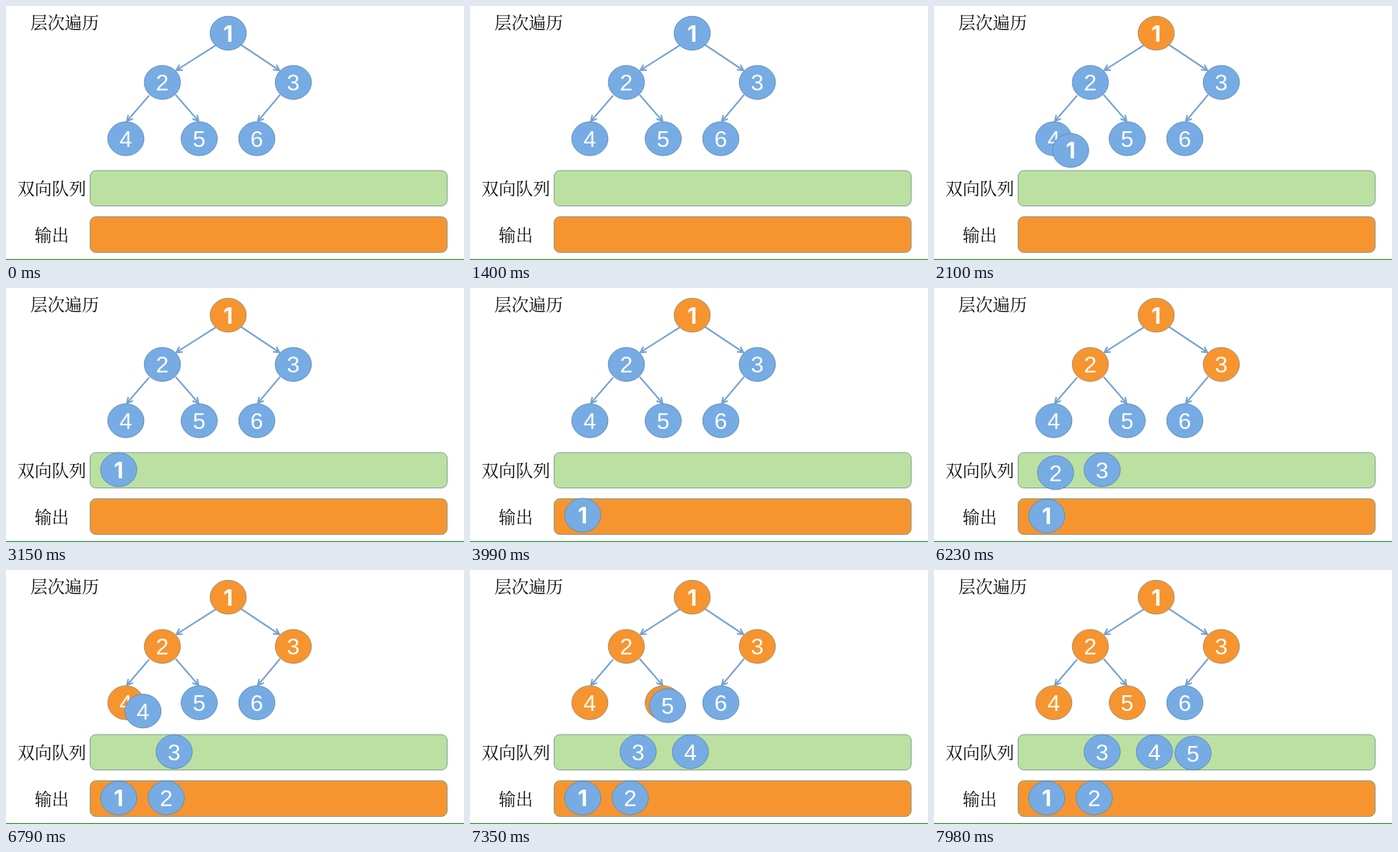
Recreate the animation shown at these times as an HTML page. Size 640 by 355 pixels, loop 8 s.

```html
<!DOCTYPE html>
<html lang="zh">
<head>
<meta charset="utf-8">
<style>
  html, body { margin: 0; width: 100%; height: 100%; overflow: hidden; background: #fff; }
  svg { display: block; width: 640px; height: 355px; }
  .label { font: 24px "Noto Serif CJK SC", "Noto Sans CJK SC", "Noto Sans CJK", serif; font-weight: 300; fill: #111; }
  .digit { font: 32px "Liberation Sans", Arial, sans-serif; fill: #fff; text-anchor: middle; }
  .bold { font: bold 31px Inter, sans-serif; }
  .bar { stroke: #7d9a94; }
  .arrow { fill: none; stroke: #78a3cf; stroke-width: 2.2; }
</style>
</head>
<body>
<svg id="stage" viewBox="0 0 640 355">
  <text class="label" x="34" y="32">层次遍历</text>
  <text class="label" x="16" y="263.5">双向队列</text>
  <text class="label" x="40" y="328.5">输出</text>
  <rect class="bar" x="117.5" y="230" width="499" height="49.5" rx="8" fill="#bbe0a2"/>
  <rect class="bar" x="117.5" y="294.5" width="499" height="50" rx="8" fill="#f6952f"/>
  <rect y="354" width="640" height="1" fill="#008000"/>
</svg>
<script>
const LOOP = 8000, MOVE = 500;
const BLUE = { fill: '#76ace3', stroke: '#5f8db8' };
const ORANGE = { fill: '#f6952f', stroke: '#a08e74' };
const stage = document.getElementById('stage');

// bend makes the vertical travel lag behind the horizontal travel
const nodes = [
  { label: 6, x: 350.5, y: 185.5, moves: [] },
  { label: 5, x: 270, y: 185.5, moves: [{ at: 7273, x: 362, y: 256, bend: 1.05 }] },
  { label: 4, x: 167.5, y: 185.5, moves: [{ at: 6660, x: 308, y: 254, bend: 1 }] },
  { label: 3, x: 401.5, y: 106.8, moves: [{ at: 4970, x: 235, y: 254, bend: 1.09 }] },
  { label: 2, x: 218.5, y: 106.8, moves: [
    { at: 4270, x: 162.5, y: 255.5, bend: 1 },
    { at: 6123, x: 224, y: 318.5, bend: 1.5 }] },
  { label: 1, x: 310.5, y: 38, moves: [
    { at: 1752, x: 157.5, y: 254, bend: 1.12 },
    { at: 3530, x: 157.5, y: 318.7, bend: 1 }] },
];

const arrows = [
  [293, 55, 238, 90], [328, 54, 382, 90], [200, 125, 169, 161],
  [237, 124, 269, 161], [383, 124, 352, 161],
];

function add(parent, tag, attrs, text = '') {
  const el = document.createElementNS('http://www.w3.org/2000/svg', tag);
  for (const key in attrs) el.setAttribute(key, attrs[key]);
  el.textContent = text;
  return parent.appendChild(el);
}

function drawArrow([x1, y1, x2, y2]) {
  const angle = Math.atan2(y2 - y1, x2 - x1);
  const barb = turn => `${x2 - 9 * Math.cos(angle + turn)} ${y2 - 9 * Math.sin(angle + turn)}`;
  add(stage, 'path', {
    class: 'arrow',
    d: `M${x1} ${y1}L${x2} ${y2}M${barb(0.5)}L${x2} ${y2}L${barb(-0.5)}`,
  });
}

function drawNode({ label, x, y }, colors) {
  const group = add(stage, 'g', { transform: `translate(${x} ${y})` });
  add(group, 'ellipse', { rx: 25.3, ry: 23.7, ...colors });
  add(group, 'text', { class: label === 1 ? 'digit bold' : 'digit', y: 11.5 }, label);
  return group;
}

const smooth = t => t * t * (3 - 2 * t);

function positionAt(node, time) {
  let { x, y } = node;
  for (const move of node.moves) {
    const p = smooth(Math.min(1, Math.max(0, (time - move.at) / MOVE)));
    x += (move.x - x) * p;
    y += (move.y - y) * p ** move.bend;
  }
  return [x, y];
}

arrows.forEach(drawArrow);
const visited = nodes.map(node => drawNode(node, ORANGE));
const tokens = nodes.map(node => drawNode(node, BLUE));

function render(time) {
  nodes.forEach((node, i) => {
    const left = node.moves.length > 0 && time >= node.moves[0].at;
    visited[i].setAttribute('visibility', left ? 'visible' : 'hidden');
    tokens[i].setAttribute('transform', `translate(${positionAt(node, time)})`);
  });
}

const start = performance.now();
function tick() {
  render((performance.now() - start) % LOOP);
  requestAnimationFrame(tick);
}
tick();
</script>
</body>
</html>
```
